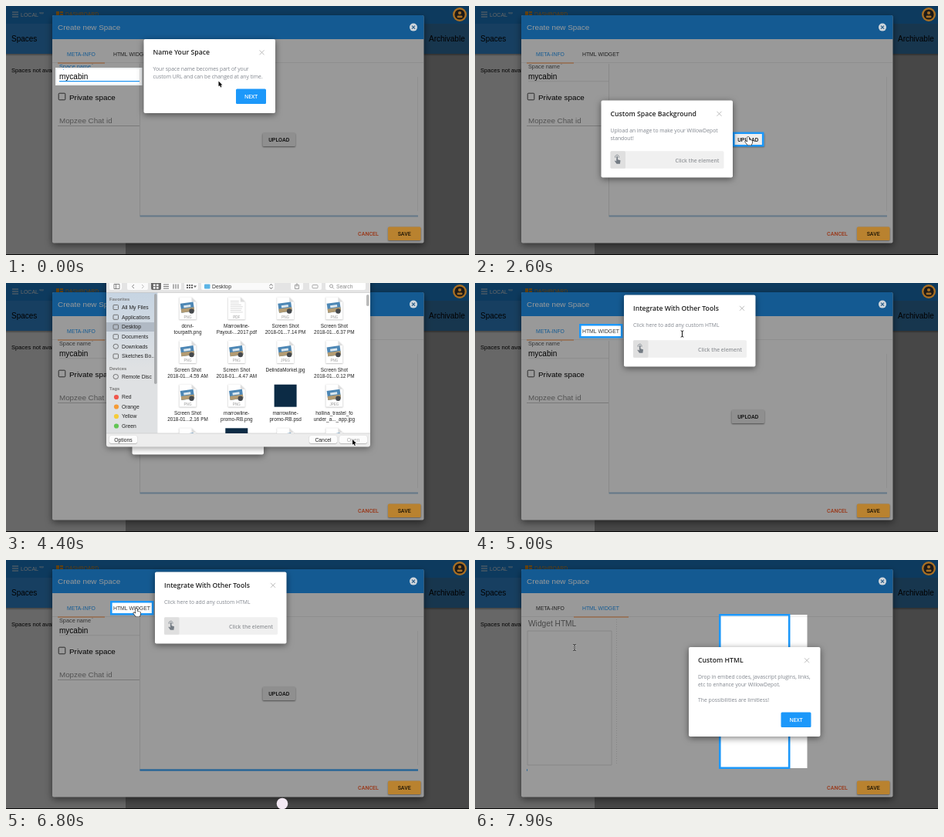
Write an HTML page with a canvas that moves like this. It is 600x323 px and loops after 8000 ms.

```html
<!DOCTYPE html>
<html lang="en">
<head>
<meta charset="utf-8">
<title>Guided tour</title>
<style>
html, body { margin: 0; width: 100%; height: 100%; overflow: hidden; background: #444; }
canvas { display: block; width: 600px; height: 323px; }
</style>
</head>
<body>
<canvas id="stage"></canvas>
<script>
const W = 600, H = 323, LOOP = 8000;
const cv = document.getElementById('stage');
const dpr = window.devicePixelRatio || 1;
cv.width = Math.round(W * dpr);
cv.height = Math.round(H * dpr);
const c = cv.getContext('2d');

const SANS = '"Liberation Sans", Arial, sans-serif';
const OPEN = '"Open Sans", sans-serif';
const ROBO = 'Roboto, sans-serif';
const BLUE = '#2196f3';

const clamp = u => Math.max(0, Math.min(1, u));
const prog = (t, a, b) => clamp((t - a) / (b - a));
const ease = u => u < .5 ? 4 * u * u * u : 1 - Math.pow(2 - 2 * u, 3) / 2;
const mix = (a, b, u) => a + (b - a) * u;

function box(x, y, w, h, fill, r = 0) {
  c.fillStyle = fill;
  c.beginPath();
  c.roundRect(x, y, w, h, r);
  c.fill();
}
function frame(x, y, w, h, col, lw = 1, r = 0) {
  c.strokeStyle = col;
  c.lineWidth = lw;
  c.beginPath();
  c.roundRect(x, y, w, h, r);
  c.stroke();
}
function disc(x, y, r, fill) {
  c.fillStyle = fill;
  c.beginPath();
  c.arc(x, y, r, 0, 7);
  c.fill();
}
function line(col, lw, ...p) {
  c.strokeStyle = col;
  c.lineWidth = lw;
  c.beginPath();
  for (let i = 0; i < p.length; i += 2) c.lineTo(p[i], p[i + 1]);
  c.stroke();
}
function poly(fill, ...p) {
  c.fillStyle = fill;
  c.beginPath();
  for (let i = 0; i < p.length; i += 2) c.lineTo(p[i], p[i + 1]);
  c.closePath();
  c.fill();
}
function fade(y0, y1, from, to) {
  const g = c.createLinearGradient(0, y0, 0, y1);
  g.addColorStop(0, from);
  g.addColorStop(1, to);
  return g;
}
function text(s, x, y, size, col, font = SANS, weight = 400, align = 'left') {
  c.font = `${weight} ${size}px ${font}`;
  c.fillStyle = col;
  c.textAlign = align;
  c.textBaseline = 'alphabetic';
  c.fillText(s, x, y + size * .36);
}
function cross(x, y, r, col, lw) {
  line(col, lw, x - r, y - r, x + r, y + r);
  line(col, lw, x + r, y - r, x - r, y + r);
}
function shadowed(blur, dy, alpha, draw) {
  c.save();
  c.shadowColor = `rgba(0,0,0,${alpha})`;
  c.shadowBlur = blur * dpr;
  c.shadowOffsetY = dy * dpr;
  draw();
  c.restore();
}
function clipped(x, y, w, h, draw) {
  c.save();
  c.beginPath();
  c.rect(x, y, w, h);
  c.clip();
  draw();
  c.restore();
}

function page() {
  box(0, 0, W, H, '#b0b0b0');
  box(0, 62, 155, 260, '#fff');
  box(0, 62, W, 3, fade(62, 65, 'rgba(0,0,0,.35)', 'rgba(0,0,0,0)'));
  box(0, 0, W, 23, '#2090ea');
  box(0, 23, 155, 39, '#3a9df0');
  box(155, 23, W - 155, 39, '#3a84c0');
  for (const y of [8, 11, 14]) line('#fff', 1, 8, y, 16, y);
  text('LOCAL', 19, 11, 7, '#fff');
  text('app', 43, 9, 3.6, '#fff');
  for (const [x, y, h] of [[65, 7, 5], [65, 13, 2], [70, 7, 2], [70, 10, 5]]) box(x, y, 4, h, '#ffa726');
  text('DASHBOARD', 77, 11, 6.8, '#ffa726');
  text('Spaces', 7, 42, 10, '#000');
  text('Archivable', 548, 42, 10, '#000');
  text('Spaces not available', 7, 83, 7.6, '#000');
  box(0, 322, W, 1, '#111');
  box(0, 0, W, H, 'rgba(0,0,0,.33)');
}

function modal(t) {
  const slide = 466 * ease(prog(t, 7330, 7630));
  const second = t > 7290;
  shadowed(10, 3, .5, () => box(60, 12, 481.5, 295.5, '#fff', 2));
  box(60, 12, 481.5, 31, BLUE, [2, 2, 0, 0]);
  text('Create new Space', 67, 27.4, 9.9, '#fff');

  clipped(67, 75, 467, 199, () => {
    c.save();
    c.translate(-slide, 0);
    details(t);
    c.translate(466, 0);
    text('Widget HTML', 69, 82, 10.2, '#777');
    frame(68, 92, 109, 174, '#d8d8d8', .8);
    c.setLineDash([1, 2]);
    line('#ddd', 1, 183.5, 77, 183.5, 266);
    c.setLineDash([]);
    c.restore();
  });

  const ripple = prog(t, 7280, 7330) * (1 - prog(t, 7400, 7650));
  box(128, 50, 71, 23, `rgba(255,140,60,${.16 * ripple})`);
  text('META-INFO', 79, 62.4, 6.8, second ? '#333' : BLUE);
  text('HTML WIDGET', 139, 62.4, 6.85, second ? BLUE : '#333');
  line('#e4e4e4', .7, 60, 73.5, 541, 73.5);
  const ink = ease(prog(t, 7310, 7560));
  line('#ff9040', 1.2, mix(67, 128, ink), 74, mix(128, 199, ink), 74);
  text('CANCEL', 469.5, 295, 7.1, '#ff5722', ROBO, 500, 'center');
}

function details(t) {
  const focus = t < 1500;
  text('Space name', 69, 78.5, 7.3, focus ? BLUE : '#555');
  text('*', 111, 76, 5, '#777');
  text('mycabin', 69, 91, 10, '#000');
  line(focus ? BLUE : '#ddd', focus ? 1.2 : .7, 69, 97.7, 173, 97.7);
  frame(68.2, 113.2, 8.6, 8.6, '#333', .9, 1);
  text('Private space', 82, 118, 9.9, '#000');
  text('Mopzee Chat id', 69, 148, 9.8, '#888');
  line('#bbb', .8, 67, 155.5, 173, 155.5);
  box(173.5, 75, 361, 198, '#fff');
  line('#ddd', .8, 173.5, 75, 173.5, 272);
  if (t >= 7250) clipped(174, 75, 360, 197, () => disc(352, 247, 139, '#efb950'));
  box(173.5, 271.6, 360.5, 2, '#a5c6e2');
  box(173.5, 271.6, 360.5 * prog(t, 5200, 6600), 2, '#34a4ff');
  shadowed(2, 1, .5, () => box(332.5, 164.5, 42.5, 17.5, '#eee', 1.5));
  text('UPLOAD', 353.8, 173, 7.2, '#111', ROBO, 500, 'center');
}

// Spotlight stops: start, end, x, y, width, height, extra hole width
const SPOTS = [
  [0, 0, 64.5, 80.5, 111.5, 22, 0],
  [1500, 1850, 334, 163.5, 40.5, 19, 0],
  [4690, 4940, 135, 53, 56.5, 18.5, 0],
  [7340, 7660, 316, 70, 92.5, 201, 23]
];
function spotlight(t) {
  let s = SPOTS[0].slice(2);
  for (const [a, b, ...to] of SPOTS.slice(1)) {
    const u = ease(prog(t, a, b));
    s = s.map((v, i) => mix(v, to[i], u));
  }
  const [x, y, w, h, extra] = s;
  c.fillStyle = 'rgba(0,0,0,.4)';
  c.beginPath();
  c.rect(0, 0, W, H);
  c.rect(x + 1, y + 1, w - 2 + extra, h - 2);
  c.fill('evenodd');
  if (t < 1500) frame(x + .5, y + .5, w - 1, h - 1, '#eef1f3', 2);
  else frame(x + 1.3, y + 1.3, w - 2.6, h - 2.6, '#1c98fa', 2.6);
}

function brightParts() {
  disc(528, 27.6, 5, '#cfd6dc');
  cross(528, 27.6, 2, '#2c5f8a', 1.2);
  shadowed(2, 1, .4, () => box(495, 286.5, 42.5, 17.5, '#b9822f', 1.5));
  text('SAVE', 516.2, 295, 7, '#1c1405', ROBO, 500, 'center');
  disc(588, 11, 9, '#a86f24');
  disc(588, 11, 6.6, '#1d1a18');
  disc(588, 9, 2.1, '#a86f24');
  box(584.5, 12.5, 7, 2.8, '#a86f24', 1.4);
}

const POPUPS = [
  [-500, 1450, 178.5, 43, 96, 'Name Your Space',
    ['Your space name becomes part of your', 'custom URL and can be changed at any time.'], true],
  [1800, 4650, 163.5, 122.5, 100, 'Custom Space Background',
    ['Upload an image to make your WillowDepot', 'standout!'], false],
  [4780, 7240, 193, 15.5, 93, 'Integrate With Other Tools',
    ['Click here to add any custom HTML'], false],
  [7640, 9000, 277, 113, 116, 'Custom HTML',
    ['Drop in embed codes, javascript plugins, links,', 'etc to enhance your WillowDepot.', '',
      'The possibilities are limitless!'], true]
];
function popup(t, [from, to, x, y, h, title, lines, next]) {
  const a = prog(t, from, from + 150) * (1 - prog(t, to, to + 100));
  if (!a) return;
  c.save();
  c.globalAlpha = a;
  c.translate(x, y);
  shadowed(9, 2, .5, () => box(0, 0, 170.5, h, '#fff', 2));
  text(title, 12, 17.3, 8.7, '#222', OPEN, 600);
  cross(153, 17.3, 3, '#b5b5b5', .9);
  lines.forEach((s, i) => text(s, 12, 39 + i * 9.7, 6.8, '#81868e', OPEN));
  if (next) {
    box(119.5, h - 31.5, 39, 19.5, '#1c98fa', 1.5);
    text('NEXT', 139, h - 21.8, 6.8, '#fff', OPEN, 600, 'center');
  } else {
    const by = h - 34.3;
    box(12, by, 147, 22.5, '#f0f0f0', 1.5);
    box(12, by, 19.5, 22.5, '#dfdfdf', 1.5);
    text('Click the element', 153, by + 12, 6.8, '#929599', OPEN, 600, 'right');
    c.strokeStyle = '#8a9097';
    c.lineWidth = .9;
    c.beginPath();
    c.arc(20.6, by + 7.5, 2.5, 2.6, 6.8);
    c.stroke();
    box(19.9, by + 6.5, 1.6, 8, '#737b83', .8);
    poly('#737b83', 20, by + 10.5, 25, by + 12, 24.4, by + 16.5, 20, by + 16.5, 17.4, by + 12.8, 18.2, by + 12.3, 20, by + 13.6);
  }
  c.restore();
}

function fileIcon(x, y, label) {
  shadowed(1.5, .5, .35, () =>
    poly('#fff', x - 11, y - 15, x + 5, y - 15, x + 11, y - 9, x + 11, y + 14, x - 11, y + 14));
  poly('#ddd', x + 5, y - 15, x + 11, y - 9, x + 5, y - 9);
  if (label === 'PDF') {
    for (let i = 0; i < 7; i++) line('#ccc', .7, x - 8, y - 10 + i * 2.4, x + (i < 2 ? 3 : 8 - i % 3), y - 10 + i * 2.4);
  } else {
    c.save();
    c.translate(x, y - 2);
    c.rotate(-.14);
    box(-9, -6, 17, 12, '#4d87b5');
    box(-9, 1, 17, 5, '#b39b72');
    box(-5, -3, 9, 3, '#dbe7ee');
    c.restore();
    disc(x + 5, y + 3, 3.2, '#45494d');
  }
  text(label, x, y + 10.5, 4.6, '#999', SANS, 400, 'center');
}

const shot = n => ['Screen Shot', '2018-01...' + n, 'PNG'];
const FILES = [
  ['dorvi-', 'tourpath.png', 'PNG'], ['Marrowline-', 'Payout-...2017.pdf', 'PDF'], shot('7.14 PM'), shot('6.37 PM'),
  shot('4.59 AM'), shot('4.47 AM'), ['DelindaMorkel.jpg', '', 'JPEG'], shot('0.12 PM'),
  shot('2.16 PM'), ['marrowline-', 'promo-RB.png', 'PNG'], ['marrowline-', 'promo-RB.psd', ''], ['hollina_trastel_fo', 'under_a..._app.jpg', 'JPEG'],
  ['', '', 'PNG'], ['', '', ''], ['', '', 'PNG'], ['', '', 'PNG']
];
const PLACES = [['All My Files', 31.5], ['Applications', 44.3], ['Desktop', 57], ['Documents', 69.7],
  ['Downloads', 82.3], ['Sketches Bo...', 95], ['Remote Disc', 121.5]];
const TAGS = [['Red', '#f0574c'], ['Orange', '#f59b36'], ['Yellow', '#f5cc3a'], ['Green', '#62c554']];

function dialog(t) {
  const shown = ease(prog(t, 2880, 3180)) * (1 - ease(prog(t, 4450, 4700)));
  if (!shown) return;
  c.save();
  c.translate(0, -235 * (1 - shown));
  shadowed(8, 2, .4, () => box(130, -20, 342, 232.5, '#ededed', [0, 0, 3, 3]));
  box(130, -20, 342, 32, '#e4e4e4');
  box(130, 12, 66.5, 183, fade(12, 110, '#c6d4e2', '#dfe1e3'));
  box(196.5, 12, 275.5, 183, '#fff');
  line('#c4c4c4', .7, 130, 12.5, 472, 12.5);
  line('#c9c9c9', .7, 130, 195, 472, 195);

  box(134, -4, 16, 13, '#fafafa', 2);
  frame(140, 1.5, 7, 6, '#666', .8);
  line('#666', .8, 142.5, 1.5, 142.5, 7.5);
  box(157, -4, 27, 13, '#fafafa', 2);
  line('#888', 1, 166, 2, 163.5, 4.5, 166, 7);
  line('#bbb', 1, 176, 2, 178.5, 4.5, 176, 7);
  box(188, -4, 39, 13, '#fafafa', 2);
  box(188, -4, 13, 13, '#6b6b6b', 2);
  for (let i = 0; i < 4; i++) box(191 + i % 2 * 4, 1.5 + (i >> 1) * 3.5, 2.6, 2.6, '#fff');
  for (const y of [2, 4.5, 7]) line('#666', .9, 204, y, 211, y);
  for (const x of [217, 220, 223]) line('#666', 1, x, 1.5, x, 7.5);
  box(231, -4, 18, 13, '#fafafa', 2);
  for (let i = 0; i < 6; i++) box(234 + i % 3 * 3, i < 3 ? 2 : 5, 2, 2, '#666');
  poly('#666', 243, 3.5, 247, 3.5, 245, 6);
  box(253, -4, 95, 13, '#fafafa', 2);
  box(257, 1.5, 7.5, 6, '#5bb4e5', 1);
  text('Desktop', 267, 4.5, 6.8, '#333');
  line('#555', .9, 341.5, 3.5, 343.5, 1.5, 345.5, 3.5);
  line('#555', .9, 341.5, 5.5, 343.5, 7.5, 345.5, 5.5);
  box(369, -4, 16, 13, '#fafafa', 2);
  frame(374.5, 2.5, 5, 5, '#888', .8);
  line('#888', .8, 377, 5, 377, 0);
  box(393, -4, 16, 13, '#fafafa', 2);
  frame(397, 2.5, 7, 4.2, '#999', .8, 1);
  box(414, -4, 52, 13, '#fff', 2);
  c.strokeStyle = '#888';
  c.lineWidth = .8;
  c.beginPath();
  c.arc(421.5, 4, 2, 0, 7);
  c.stroke();
  line('#888', .8, 423, 5.5, 425, 7.5);
  text('Search', 428, 4.5, 6.8, '#888');

  for (const [s, y] of [['Favorites', 20.5], ['Devices', 110.5], ['Tags', 137]]) text(s, 134, y, 5.9, '#777', SANS, 700);
  box(130, 51, 62, 12, '#b0b9c4');
  for (const [s, y] of PLACES) {
    frame(139, y - 3, 6.5, 6, '#666', .9, s === 'Downloads' || s === 'Remote Disc' ? 3 : 1);
    text(s, 150, y, 6.8, '#222');
  }
  TAGS.forEach(([s, col], i) => {
    disc(143, 148 + i * 12.5, 3.1, col);
    text(s, 150, 148 + i * 12.5, 6.8, '#222');
  });
  box(192, 14, 3.6, 117, '#a9abad', 1.8);

  clipped(197, 13, 275, 182, () => FILES.forEach(([a, b, kind], i) => {
    const x = 235.5 + i % 4 * 63.3, y = 33.5 + (i >> 2) * 56.6;
    if (kind) fileIcon(x, y, kind);
    else box(x - 14.5, y - 15, 29, 29, '#0c2b45');
    text(a, x, y + 22.3, 6.4, '#222', SANS, 400, 'center');
    text(b, x, y + 30.3, 6.4, '#222', SANS, 400, 'center');
  }));
  box(467, 15, 3.6, 15, '#b9b9b9', 1.8);

  for (const [s, x, w, col] of [['Options', 134, 36, '#222'], ['Cancel', 393, 36, '#222'], ['Open', 432, 36, '#aaa']]) {
    shadowed(1, .4, .4, () => box(x, 198, w, 10, '#fcfcfc', 2));
    text(s, x + w / 2, 203.3, 6.8, col, SANS, 400, 'center');
  }
  c.restore();
}

// Pointer stops: time, x, y
const PATH = [[0, 275.5, 97.5], [700, 275.5, 97.5], [1200, 316, 119], [1600, 316, 119], [2350, 354, 170],
  [3200, 354, 170], [3450, 349, 165], [3700, 349, 165], [4150, 449, 203], [4450, 449, 203], [4950, 268.5, 66],
  [5900, 268.5, 66], [6600, 169, 63], [7450, 169.5, 62.5], [7850, 129, 113.5], [8000, 129, 113.5]];
const SHAPES = [[0, 'arrow'], [1150, 'hand'], [1500, 'arrow'], [2250, 'hand'], [2900, 'arrow'],
  [4800, 'beam'], [6100, 'arrow'], [6450, 'hand'], [7320, 'arrow'], [7650, 'beam']];

function pointer(t) {
  const i = Math.max(1, PATH.findIndex(p => p[0] > t));
  const [ta, xa, ya] = PATH[i - 1], [tb, xb, yb] = PATH[i];
  const u = ease(prog(t, ta, tb));
  const kind = SHAPES.filter(s => s[0] <= t).pop()[1];
  c.save();
  c.translate(mix(xa, xb, u), mix(ya, yb, u));
  c.lineJoin = 'round';
  if (kind === 'beam') {
    for (const [col, lw] of [['rgba(255,255,255,.7)', 2], ['#111', 1]]) {
      line(col, lw, 0, -3.5, 0, 3.5);
      line(col, lw, -1.8, -4.2, 0, -3.4, 1.8, -4.2);
      line(col, lw, -1.8, 4.2, 0, 3.4, 1.8, 4.2);
    }
  } else {
    const hand = kind === 'hand';
    c.beginPath();
    const p = hand
      ? [-.9, 0, .9, 0, 1, 3.5, 5, 4.6, 5.3, 7, 4, 10.5, -.5, 10.5, -4, 6, -3, 5, -1, 6.5]
      : [0, 0, 0, 6.8, 1.6, 5.4, 2.7, 8, 3.9, 7.5, 2.8, 5, 4.9, 4.9];
    for (let k = 0; k < p.length; k += 2) c.lineTo(p[k], p[k + 1]);
    c.closePath();
    c.strokeStyle = hand ? '#111' : '#fff';
    c.lineWidth = 1.2;
    c.stroke();
    c.fillStyle = hand ? '#fff' : '#000';
    c.fill();
  }
  c.restore();
}

// A dock icon hops over the bottom edge
function dockIcon(t) {
  if (t < 4900) return;
  const d = ((t - 6800 + 8400) % 800 - 400) / 200;
  if (Math.abs(d) < 1) disc(358, 316 + 15 * d * d, 7.3, '#f3e9f3');
}

function draw(t) {
  c.setTransform(dpr, 0, 0, dpr, 0, 0);
  page();
  modal(t);
  spotlight(t);
  brightParts();
  for (const p of POPUPS) popup(t, p);
  dialog(t);
  dockIcon(t);
  pointer(t);
}

const start = performance.now();
function tick(now) {
  draw(Math.max(0, now - start) % LOOP);
  requestAnimationFrame(tick);
}
draw(0);
requestAnimationFrame(tick);
</script>
</body>
</html>
```
